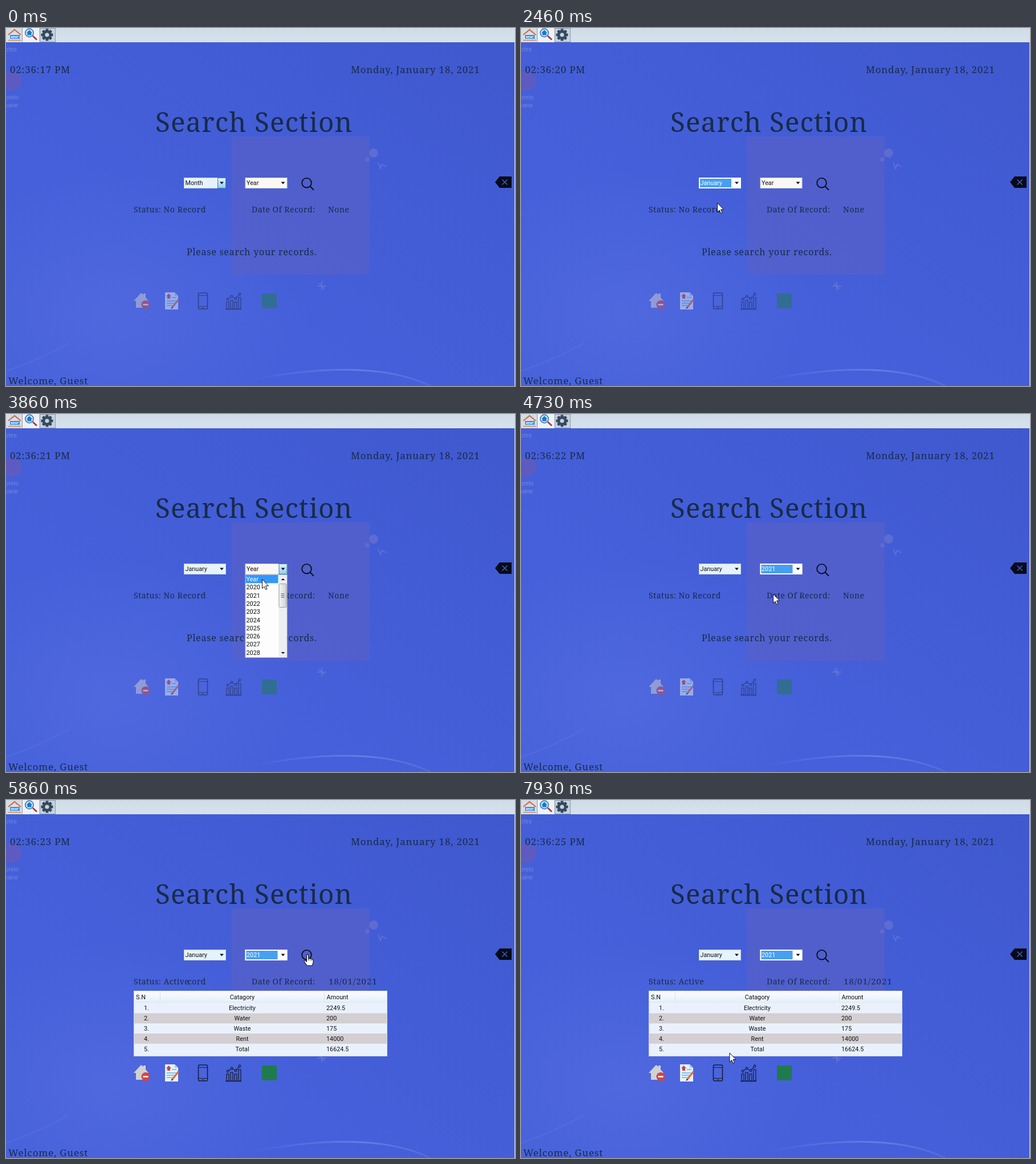
An HTML page for the animation above (8 s loop, 893 px wide and 627 px high).

```html
<!DOCTYPE html>
<html lang="en">
<head>
<meta charset="utf-8">
<title>Search Section</title>
<style>
html, body { margin: 0; width: 100%; height: 100%; overflow: hidden; background: #435dd5; }
svg { display: block; width: 100vw; height: 100vh; }
text { white-space: pre; }
.serif { font-family: "Noto Serif", serif; fill: #182b49; }
.ui { font: 10.8px Roboto, "Open Sans", sans-serif; fill: #111; }
</style>
</head>
<body>
<svg id="stage" viewBox="0 0 893 627" xmlns="http://www.w3.org/2000/svg"></svg>
<script>
const LOOP = 8000;
const MONTHS = ["Month", "January", "February", "March", "April", "May", "June", "July", "August", "September"];
const YEARS = ["Year", ...Array.from({ length: 9 }, (_, i) => String(2020 + i))];
const ROWS = [["Electricity", "2249.5"], ["Water", "200"], ["Waste", "175"], ["Rent", "14000"], ["Total", "16624.5"]];
const ITEM = 14.3;

// Moments of the clicks
const MONTH_OPEN = 800, MONTH_SET = 2200, YEAR_OPEN = 3200, YEAR_SET = 4730, FOUND = 5860;

// Pointer stops: time, x, y
const PATH = [
  [60, 385, 290], [530, 376, 272], [860, 376, 272], [1330, 359, 293], [1530, 344, 306],
  [2460, 344, 306], [2860, 445, 273], [3200, 447, 272], [3460, 451, 271], [3660, 451, 271],
  [3860, 449, 289], [4000, 449, 289], [4460, 442, 315], [4730, 442, 315], [5460, 529, 270],
  [7330, 529, 270], [7930, 365.5, 442.5]
];

const rect = (x, y, w, h, fill, extra = "") =>
  `<rect x="${x}" y="${y}" width="${w}" height="${h}" fill="${fill}" ${extra}/>`;
const path = (d, fill, extra = "") => `<path d="${d}" fill="${fill}" ${extra}/>`;
const line = (d, color, width = 1, extra = "") =>
  path(d, "none", `stroke="${color}" stroke-width="${width}" ${extra}`);
const circle = (x, y, r, fill, extra = "") => `<circle cx="${x}" cy="${y}" r="${r}" fill="${fill}" ${extra}/>`;
const serif = (x, y, size, gap, str, extra = "") =>
  `<text class="serif" x="${x}" y="${y}" font-size="${size}" letter-spacing="${gap}" ${extra}>${str}</text>`;
const ui = (x, y, str, extra = "") => `<text class="ui" x="${x}" y="${y}" ${extra}>${str}</text>`;
const group = (id, body, extra = "") => `<g id="${id}" ${extra}>${body}</g>`;
const arrow = (x, y, s = 1) => path(`M${x - 3.5} ${y - 2 * s}h7l-3.5 ${4 * s}z`, "#111");

function backdrop() {
  return `<defs>
    <linearGradient id="sky" x1="0" y1="1" x2="1" y2="0">
      <stop offset="0" stop-color="#4560d9"/><stop offset=".35" stop-color="#4560da"/>
      <stop offset=".7" stop-color="#425cd5"/><stop offset="1" stop-color="#3f58cd"/>
    </linearGradient>
    <radialGradient id="glow">
      <stop offset="0" stop-color="#5c72e4" stop-opacity=".45"/><stop offset="1" stop-color="#5c72e4" stop-opacity="0"/>
    </radialGradient>
    <linearGradient id="bar" x2="0" y2="1">
      <stop offset="0" stop-color="#d0dbe7"/><stop offset="1" stop-color="#d5e2eb"/>
    </linearGradient>
    <linearGradient id="arc"><stop offset="0" stop-color="#8194ee" stop-opacity="0"/>
      <stop offset=".6" stop-color="#8194ee" stop-opacity=".55"/><stop offset="1" stop-color="#8194ee" stop-opacity=".2"/>
    </linearGradient>
    <linearGradient id="hover" x2="0" y2="1">
      <stop offset="0" stop-color="#e0f3fd"/><stop offset=".5" stop-color="#b8e2f8"/><stop offset="1" stop-color="#8fcbed"/>
    </linearGradient>
    <linearGradient id="thumb"><stop offset="0" stop-color="#f4f4f4"/><stop offset="1" stop-color="#cfd1d4"/></linearGradient>
    <linearGradient id="head" x2="0" y2="1">
      <stop offset="0" stop-color="#fff"/><stop offset="1" stop-color="#e3effa"/>
    </linearGradient>
  </defs>` +
    rect(0, 0, 893, 627, "url(#sky)") +
    `<ellipse cx="180" cy="500" rx="330" ry="250" fill="url(#glow)"/>` +
    line("M0 601Q60 580 110 552", "#6c80e4", 2, 'opacity=".3"') +
    line("M430 616Q640 576 745 627", "url(#arc)", 3) +
    rect(396, 190, 242, 242, "#5a62c6", 'opacity=".6"') +
    circle(645, 219, 8, "#6873cf", 'opacity=".7"') + circle(634, 230, 4, "#6873cf", 'opacity=".6"') +
    line("M653 236l4 10 3-7 7 4M546 452h16M554 444v16M549 447l10 10", "#7580d8", 2, 'opacity=".55"') +
    `<g opacity=".5">${circle(10, 93, 17, "#7659ad")}` +
    ["otes", "orelo", "vane"].map((s, i) =>
      ui(-2, [41, 125, 139][i], s, 'style="fill:#a0a9e6"')).join("") + `</g>`;
}

function toolbar() {
  const teeth = Array.from({ length: 8 }, (_, i) =>
    rect(69.5, 1.5, 5, 6, "#34495e", `rx="1" transform="rotate(${i * 45} 72 12)"`)).join("");
  return rect(0, 0, 893, 25, "url(#bar)") +
    rect(0, 0, 28, 24, "#d5dde4") + rect(29, 0, 29, 25, "#eef2f6") + rect(59.5, .5, 27, 24, "#c6d2dd", 'stroke="#8d99a8"') +
    line("M28.5 0V24", "#929ba8") +
    rect(6, 10, 18, 11, "#e4e7ea") + line("M4 12L15 3l11 9", "#d4694f", 2.2) +
    rect(7, 12, 17, 7, "#348edb") + ui(15.5, 17.8, "RENT", 'text-anchor="middle" style="font-size:5.5px;font-weight:700;fill:#fff"') +
    line("M4 21.5H26", "#e0965c", 2) +
    line("M47 14l7 6.5", "#a33b3e", 2.8) + circle(41, 8.5, 7.2, "#bfe2fa", 'stroke="#3b6fb4" stroke-width="1.5"') +
    path("M36 8.5l5-5 5 5h-1.5v4h-7v-4z", "#1978c8") +
    teeth + circle(72, 12, 8, "#34495e") + circle(72, 12, 3.6, "#c6d2dd") +
    line("M892.5 0V627", "#d3dcf2");
}

function fixedTexts() {
  return serif(605, 79, 17, .78, "Monday, January 18, 2021") +
    serif(262, 182, 47.5, 1.1, "Search Section") +
    serif(431, 323, 14, .5, "Date Of Record:") +
    serif(4, 624, 17, .8, "Welcome, Guest");
}

function tools() {
  const home = path("M224 478l13-14 4 3v-2h4v7l5 6h-3v12h-19v-12z", "#d0d1d3") +
    circle(245, 484.5, 7.5, "#d9433f") + rect(240.5, 483.2, 9, 2.6, "#fff");
  const report = path("M279 463h17l6 6v24h-23z", "#e4f3fb") + path("M296 463v6h6z", "#a9cbe0") +
    path("M281 470l4.5-5 4.5 5h-2v4h-5v-4z", "#d2413c") +
    line("M291 472h8M282 478h16M282 482h13M282 486h10", "#64b3de", 1.5) +
    line("M292 489l11-14", "#e4643b", 3) + path("M289.5 492l1-4 3 2z", "#333");
  const phone = rect(337.5, 464, 16, 28, "none", 'rx="2.5" stroke="#17203c" stroke-width="1.6"') +
    line("M338 468.5h15M338 487.5h15M343 490h5", "#17203c");
  const chart = [[387, 480], [394, 477], [401, 480], [408, 472]].map(([x, y]) =>
    rect(x, y, 4, 492 - y, "none", 'stroke="#17203c" stroke-width="1.3"')).join("") +
    line("M385 492.5h28M389 475l7-5 7 4 7-8", "#17203c", 1.3) +
    [[389, 475], [396, 470], [403, 474], [410, 466]].map(([x, y]) =>
      circle(x, y, 1.8, "#435dd5", 'stroke="#17203c" stroke-width="1.2"')).join("");
  return home + report + phone + chart + rect(449, 465, 26, 26, "#1f7b4d");
}

function combo(id, x, tint) {
  return group(id,
    rect(x + .5, 262.5, 73, 18, tint, 'stroke="#c5d4e8"') +
    group(id + "Hot", rect(x + 59.5, 262.5, 14, 18, "url(#hover)", 'stroke="#3c7fb1"')) +
    group(id + "Focus", rect(x + .5, 262.5, 73, 18, "#fff", 'stroke="#f4f9ff"') + rect(x + 2, 264, 55, 15, "#479ff4")) +
    arrow(x + 66.5, 271.5) + ui(x + 2.5, 275.2, "", `id="${id}Text"`));
}

function list(id, x, items, thumb) {
  const grip = 297 + thumb / 2;
  return group(id,
    rect(x + .5, 281.5, 73, 145, "#fdfdfe", 'stroke="#b3bccb"') +
    rect(x + 59, 282, 14, 144, "#eceef1") +
    rect(x + 59.5, 297.5, 13, thumb, "url(#thumb)", 'rx="1.5" stroke="#979a9f"') +
    line(`M${x + 63} ${grip - 2.5}h6m-6 3h6m-6 3h6`, "#555") +
    arrow(x + 66.5, 289.5, -.8) + arrow(x + 66.5, 418.5, .8) +
    rect(x + 1, 282, 57, ITEM, "#3397fd", `id="${id}Mark"`) +
    items.map((s, i) => ui(x + 2, 293 + i * ITEM, s, `class="ui"`)).join(""));
}

function table() {
  const mid = 'text-anchor="middle"';
  return rect(224, 334, 445, 115, "#f3f9fe", 'opacity=".95"') + rect(224, 334, 445, 20, "url(#head)", 'opacity=".9"') +
    rect(224, 373.5, 445, 17.8, "#d3cfd2") + rect(224, 409, 445, 17.8, "#d3cfd2") +
    line("M270.5 336V353M558.5 336V353", "#d5e2ee") + line("M224 354H669", "#dbe6f0") +
    rect(224.5, 334.5, 444, 114, "none", 'stroke="#cfdcf0"') +
    ui(228, 348.5, "S.N") + ui(414.5, 348.5, "Catagory", mid) + ui(562.5, 348.5, "Amount") +
    ROWS.map(([name, sum], i) => {
      const y = 368.2 + i * 17.9;
      return ui(246.5, y, `${i + 1}.`, mid) + ui(414.5, y, name, mid) + ui(562, y, sum);
    }).join("");
}

const ARROW = path("M.5 .5V16.500L4 13L6.500 18.500L9 17.500L6.500 12H11.500Z", "#fff", 'stroke="#111" stroke-width="1"');
const HAND = path("M-1.5 1.5Q0-.8 1.5 1.5V7.5L4 7.2L6.5 8L9 9L10 11V15L8 20H-1L-5.5 13.5Q-6.5 10.5-4 11L-1.5 13Z",
  "#fff", 'stroke="#111" stroke-width="1.1"') + line("M1.5 8v3M4.2 8v3M6.9 9v2.5", "#111", .9);

const stage = document.getElementById("stage");
stage.innerHTML = backdrop() + toolbar() + fixedTexts() +
  serif(7, 79, 17, .78, "", 'id="clock"') +
  serif(224, 323, 14, .55, "", 'id="status"') +
  serif(351, 323, 14, .55, "cord", 'id="trail" text-anchor="end"') +
  group("none", serif(565, 323, 14, .6, "None") + serif(317, 397.5, 16, .75, "Please search your records.")) +
  group("found", serif(566, 323, 15, 1, "18/01/2021") + table()) +
  group("tools", tools()) +
  path("M858 270l8-10h21v20h-21z", "#070b18") + line("M870.500 265.500l9 9m0-9l-9 9", "#4068c8", 1.4) +
  circle(527.5, 271.2, 8.3, "none", 'stroke="#091022" stroke-width="1.9"') +
  line("M533.5 277.300l6.500 6.500", "#091022", 2.1, 'id="handle"') +
  combo("month", 312, "#e6f3fc") + combo("year", 419.5, "#fbf8f4") +
  list("months", 312, MONTHS, 89) + list("years", 419.5, YEARS, 41) +
  group("pointer", group("arrow", ARROW) + group("hand", HAND));

const el = Object.fromEntries([...stage.querySelectorAll("[id]")].map(n => [n.id, n]));
const show = (id, on) => el[id].setAttribute("display", on ? "inline" : "none");

function pointerAt(t) {
  const next = PATH.findIndex(p => p[0] > t);
  if (next === 0) return PATH[0].slice(1);
  if (next < 0) return PATH[PATH.length - 1].slice(1);
  const [t0, x0, y0] = PATH[next - 1], [t1, x1, y1] = PATH[next];
  const k = (t - t0) / (t1 - t0), e = k * k * (3 - 2 * k);
  return [x0 + (x1 - x0) * e, y0 + (y1 - y0) * e];
}

function setCombo(id, label, hot, focus) {
  show(id + "Hot", hot);
  show(id + "Focus", focus);
  el[id + "Text"].textContent = label;
  el[id + "Text"].style.fill = focus ? "#fff" : "#111";
}

// Marks the row under the pointer
function setList(id, open, row) {
  show(id, open);
  el[id + "Mark"].setAttribute("y", 282 + row * ITEM);
  el[id].querySelectorAll("text").forEach((n, i) => { n.style.fill = i === row ? "#fff" : "#111"; });
}

function draw(t) {
  const [x, y] = pointerAt(t);
  const found = t >= FOUND;
  const monthOpen = t >= MONTH_OPEN && t < MONTH_SET;
  const yearOpen = t >= YEAR_OPEN && t < YEAR_SET;
  const overYear = x > 419 && x < 494 && y > 261 && y < 281;
  const overSearch = x > 518 && x < 541 && y > 261 && y < 285;
  const row = Math.max(0, Math.floor((y - 282) / ITEM));

  el.clock.textContent = `02:36:${t < 60 ? 17 : 18 + Math.floor(t / 1000)} PM`;
  el.status.textContent = found ? "Status: Active" : "Status: No Record";
  show("trail", found && t < 6000);
  show("none", !found);
  show("found", found);
  el.tools.setAttribute("opacity", found ? 1 : .5);

  setCombo("month", t < MONTH_SET ? "Month" : "January", t < MONTH_SET, t >= MONTH_SET && t < YEAR_OPEN);
  setCombo("year", t < YEAR_SET ? "Year" : "2021", yearOpen || (overYear && t < YEAR_OPEN), t >= YEAR_SET);
  setList("months", monthOpen, row);
  setList("years", yearOpen, row);

  show("handle", !overSearch);
  show("pointer", t >= 60);
  show("arrow", !overSearch);
  show("hand", overSearch);
  el.pointer.setAttribute("transform", `translate(${x} ${y})`);
}

const start = performance.now();
function tick() {
  draw((performance.now() - start) % LOOP);
  requestAnimationFrame(tick);
}
tick();
</script>
</body>
</html>
```
